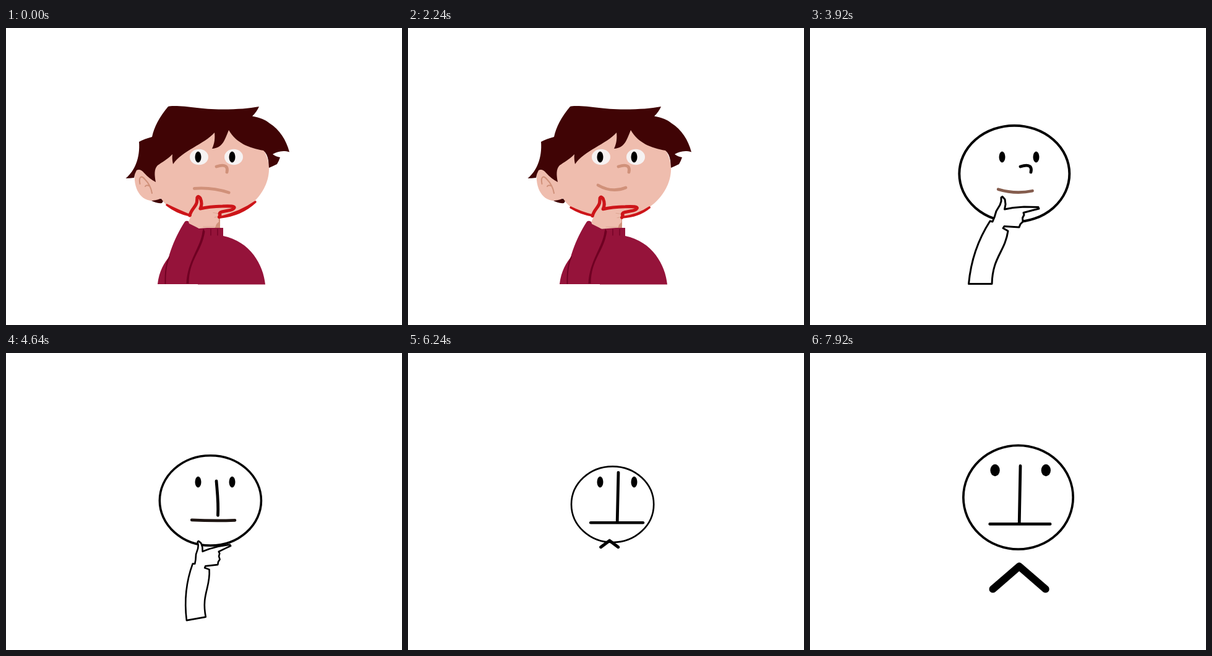
Animation of 640 by 480 pixels, one loop 8 s. Source, as an HTML page with a canvas:

```html
<!DOCTYPE html>
<html lang="en">
<head>
<meta charset="utf-8">
<title>Thinking face</title>
<style>
  html, body { margin: 0; width: 100%; height: 100%; overflow: hidden; background: #fff; }
  canvas { display: block; width: 640px; height: 480px; }
</style>
</head>
<body>
<canvas id="stage" width="640" height="480"></canvas>
<script>
const ctx = document.getElementById('stage').getContext('2d');
const LOOP = 8000, STEP = 80;
const SKIN = '#efbdae', SHADE = '#d0917a', HAIR = '#400405',
      KNIT = '#95133a', FOLD = '#6f0022', RED = '#cd1519', INK = '#000';

const hair = new Path2D(`M262 127 C264 126 267 126 272 126 C295 126 315 131.5 350 131.5
  C375 131.5 392 130 409 127 Q405 136 398 142.5 C411 145 419 148 426 154
  C442 164 453 181 458 200.5 C447 197 438 200 431 204 Q436 208 443 209
  Q441 215 438 220 Q432 223 425 226 L424 214 Q422 203 416 198
  C393 194 372 186 360 165 C353 182 350 194 333 195 C337 187 338 178 337 169
  C320 188 285 198 270 220 Q268 211 269 204 C260 213 252 217 245 222
  C239 228 240 238 242 249 Q232 244 223 234 Q217 227 211 230 Q208 235 207 242
  Q200 243 193.5 243 C208 231 217 210 215 184 Q224 179 236 176 Q241 152 262 127 Z`);
const nape = new Path2D('M233 278 Q243 284 252 283 L257 275 Z');
const face = new Path2D(`M425 228 C425 265 390 306 332 308 C285 309 240 292 240 235
  C240 190 280 152 332 152 C385 152 425 190 425 228 Z`);
const ear = new Path2D('M209 229 C204 252 214 279 236 279 Q248 278 251 274 L250 245 L220 226 Z');
const earFold = new Path2D('M216.5 252 C214 240 219 238 224 244 Q234 254 236 267 M225 256 Q227 253 231 255');
const neck = new Path2D('M316 295 H346 V324 H316 Z');
const neckShade = new Path2D('M346 306 V324 H337 Q341 316 341 306 Z');
const torso = new Path2D(`M245 414 C247 394 256 378 264 370 L300 330 L314 323 L351 323 L351 336
  C395 345 416 383 419 414.5 L310 414.5 L310 414 Z`);
const ribs = new Path2D('M331 325 V335 M342 325 V335');
const sleeve = new Path2D(`M289 313 Q291 311 294 312 L300 316 L312 324 L321 328
  C316 362 295 370 294 413.5 L257 413.5 C257 376 271 341 289 313 Z`);
const sleeveFold = new Path2D('M319 324 L321.5 329 C316 363 296 373 295.5 413 L291.5 413 C293 376 315 354 317.5 329 Z');
const elbow = new Path2D('M264 370 Q257 384 257.5 413');

const handLine = `M295 313 L298 306 L301 296 L307 286 L309 280 V274 L311 272.5 L315 277 L316 285 L314.5 293
  L328 290.5 L346 289 L369 289.5 L370 292 L360 294.5 L345 298.5 L346 302 L343.5 307 L344 313 L340 317 L338 322`;
const hand = new Path2D(handLine + 'L312 324 L296 316 Z');
const knuckles = new Path2D('M335 298.5 L344 300 M337 306 L344 304.5 M319 321 H337');
const arm = new Path2D(handLine + `L314 320.5 L312 323.5 L320 328 C315 362 295 370 294 413.5
  H256.5 C260 375 271 343 291 312 Z`);
const thumb = new Path2D(`M297 303 C299 293 308 288 308.5 281 L309 274 Q311 270.5 314 275
  Q318 284 314 292 Q328 288.5 350 288 Q370 287 369 290.5 Q367 294 359 295
  L349 297 Q343.5 298.5 346 302 L344.5 305.5`);

const lerp = (a, b, k) => a + (b - a) * k;
const mix = (a, b, k) => a.map((v, i) => lerp(v, b[i], k));
const ramp = (t, a, b) => Math.min(1, Math.max(0, (t - a) / (b - a)));
const inkOf = k => `rgb(${mix([208, 145, 122], [0, 0, 0], k).map(Math.round)})`;

function fill(path, color) {
  ctx.fillStyle = color;
  ctx.fill(path);
}

function stroke(path, color, width) {
  ctx.strokeStyle = color;
  ctx.lineWidth = width;
  ctx.stroke(path);
}

function veil(alpha) {
  ctx.globalAlpha = alpha;
  ctx.fillStyle = '#fff';
  ctx.fillRect(0, 0, 640, 480);
  ctx.globalAlpha = 1;
}

function oval(x, y, rx, ry) {
  const p = new Path2D();
  p.ellipse(x, y, rx, ry, 0, 0, Math.PI * 2);
  return p;
}

function shifted(by, paint) {
  ctx.save();
  ctx.translate(by * 1.6, by);
  paint();
  ctx.restore();
}

function drawFolds() {
  stroke(elbow, FOLD, 1.8);
  fill(sleeveFold, FOLD);
}

function drawBody() {
  fill(nape, HAIR);
  fill(ear, SKIN);
  stroke(earFold, SHADE, 2);
  fill(neck, SKIN);
  fill(neckShade, SHADE);
  fill(torso, KNIT);
  stroke(ribs, FOLD, 1.2);
  fill(face, SKIN);
  fill(hair, HAIR);
  fill(oval(312, 208.5, 15, 12.8), '#f6f2f2');
  fill(oval(368, 208.5, 15, 12.8), '#f6f2f2');
}

function drawSleeve(slide) {
  fill(sleeve, KNIT);
  drawFolds();
  shifted(slide, () => {
    fill(hand, SKIN);
    stroke(knuckles, '#dca692', 1.2);
  });
}

// Tapered jaw line between two points, bulging towards (cx, cy).
function crescent(x0, y0, cx, cy, x1, y1, thick) {
  const p = new Path2D();
  p.moveTo(x0, y0);
  p.quadraticCurveTo(cx, cy + thick, x1, y1);
  p.quadraticCurveTo(cx, cy - thick, x0, y0);
  fill(p, RED);
  stroke(p, RED, 3.4);
}

function drawRub(wide) {
  const thick = 0.5 + 2 * wide;
  const lx = 264 - 4 * wide, ly = 291.5 - 5.5 * wide;
  const rx = 386 + 17 * wide, ry = 293 - 12 * wide;
  crescent(lx, ly, lerp(lx, 298, 0.45), (ly + 303) / 2 + 2.5, 298, 303, thick);
  crescent(rx, ry, lerp(rx, 346, 0.4), lerp(ry, 306, 0.6) + 4, 346, 306, thick);
  shifted(1 - wide, () => stroke(thumb, RED, 5.2));
}

function drawHead(t) {
  const settle = 1.5 * (ramp(t, 2500, 3900) - 1);
  const shrink = ramp(t, 3900, 6300), grow = ramp(t, 6300, LOOP);
  const track = (a, b, c) => lerp(lerp(a, b, shrink), c, grow);
  stroke(oval(track(330.3, 330.6, 336.8) + settle, track(235.5, 244.9, 232.7) + settle,
    track(89.2, 66, 89.8), track(78, 60.9, 85.1)), INK, track(4, 2.6, 3.8));
}

// The arm drops as one affine move that turns about the thumb tip.
function droppedArm(k) {
  const a = lerp(1, 0.772, k), b = -0.19 * k, c = 0.236 * k, d = lerp(1, 0.81, k);
  const px = 311, py = 272.5, p = new Path2D();
  p.addPath(arm, new DOMMatrix([a, b, c, d, px - a * px - c * py, py + 40.5 * k - b * px - d * py]));
  return p;
}

function drawArm(t, fade) {
  const rest = 1 - ramp(t, 5100, 6100);
  if (rest === 0) return;
  const drop = ramp(t, 3920, 4850), outline = droppedArm(drop);
  ctx.globalAlpha = rest;
  fill(outline, '#fff');
  ctx.globalAlpha = rest * fade;
  stroke(outline, INK, lerp(3, 2.5, drop));
  ctx.globalAlpha = 1;
}

function drawEyes(t) {
  const k = ramp(t, 6260, LOOP);
  for (const side of [-1, 1]) {
    fill(oval(338 + 2.3 * k + side * (27.5 + 14.3 * k), 208.5 - 19.9 * k, 5 + 2.8 * k, 9 + 0.7 * k), INK);
  }
}

function drawNose(t) {
  const grow = ramp(t, 4850, LOOP), top = 202 - 20 * grow, end = 271 + 5 * grow;
  const stem = [340, top, 339.4, lerp(top, end, 1 / 3), 338.8, lerp(top, end, 2 / 3), 338.2, end];
  const [x, y, ...curve] = mix([340, 224, 348, 221.5, 360, 219.5, 357, 233], stem, ramp(t, 3920, 4850));
  const p = new Path2D();
  p.moveTo(x, y);
  p.bezierCurveTo(...curve);
  stroke(p, inkOf(ramp(t, 2800, 3600)), 4.8);
}

function drawMouth(t) {
  const fret = ramp(t, 0, 1000), cheer = ramp(t, 1280, 2000);
  const flat = ramp(t, 3400, 4850), grow = ramp(t, 4850, LOOP);
  const x = 332.3 - 3.8 * fret + cheer + 6.5 * flat + 3.5 * grow;
  const y = 262.7 + 0.8 * fret - 7.5 * cheer + 16.5 * flat + 4 * grow;
  const half = 28 - 5.5 * fret + 14.5 * flat + 12 * grow;
  const tilt = 3.3 - 1.8 * fret + 0.5 * cheer - 2 * flat;
  const bend = -5.5 - 2.5 * fret + 19 * cheer - 11 * flat;
  const p = new Path2D();
  p.moveTo(x - half, y - tilt);
  p.quadraticCurveTo(x, y + bend, x + half, y + tilt);
  stroke(p, inkOf(flat), 4.7);
}

function drawChevron(t) {
  const flip = ramp(t, 5520, 6300), grow = ramp(t, 6300, LOOP);
  const x = 322.5 + 3.5 * flip + 12.7 * grow, y = 329 - 28 * flip + 46 * grow;
  const half = 8.5 + 6 * flip + 29.5 * grow, drop = -7.5 + 19.5 * flip + 26 * grow;
  const p = new Path2D();
  p.moveTo(x - half, y + drop);
  p.lineTo(x, y);
  p.lineTo(x + half, y + drop);
  ctx.globalAlpha = ramp(t, 5100, 5500);
  stroke(p, INK, 2.6 + 2.6 * flip + 7.1 * grow);
  ctx.globalAlpha = 1;
}

function draw(t) {
  const fade = ramp(t, 2500, 3500);
  const wide = 0.5 + 0.5 * Math.cos(2 * Math.PI * t / 1680);
  veil(1);
  ctx.lineCap = ctx.lineJoin = 'round';

  if (fade < 1) {
    drawBody();
    veil(fade);
  }
  if (fade === 0) {
    drawSleeve(1 - wide);
  } else {
    ctx.globalAlpha = 1 - fade;
    drawFolds();
    ctx.globalAlpha = fade;
    drawHead(t);
    drawArm(t, fade);
  }
  if (fade < 1) {
    ctx.globalAlpha = 1 - fade / 2 - fade * fade / 2;
    drawRub(wide);
    ctx.globalAlpha = 1;
  }
  drawEyes(t);
  drawNose(t);
  drawMouth(t);
  drawChevron(t);
}

let start;
function tick(now) {
  start ??= now;
  draw(Math.floor((now - start) % LOOP / STEP) * STEP);
  requestAnimationFrame(tick);
}
draw(0);
requestAnimationFrame(tick);
</script>
</body>
</html>
```
